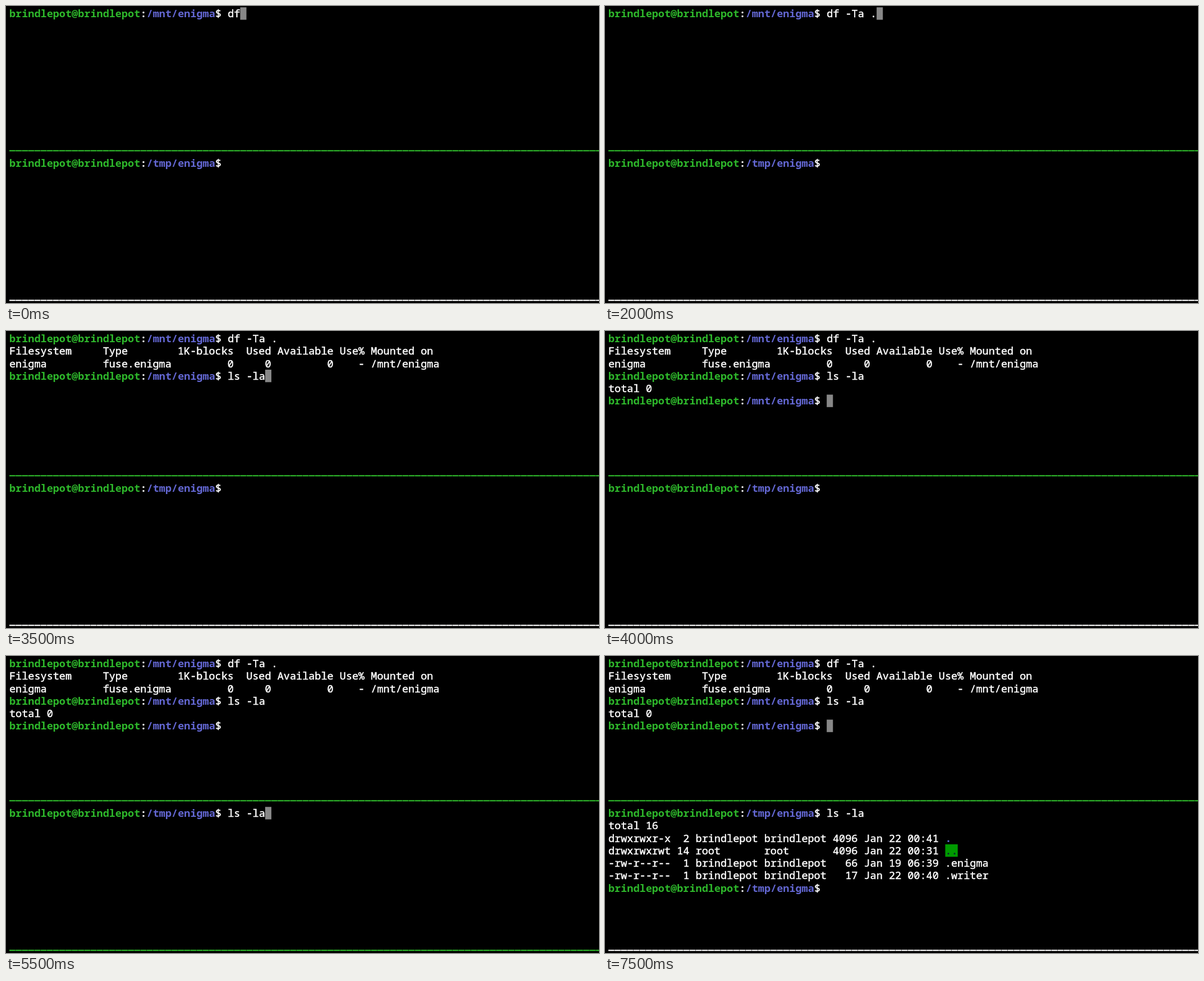
An HTML page with a canvas that plays this animation: 1057x530 px, repeating every 8 s.

```html
<!DOCTYPE html>
<html lang="en">
<head>
<meta charset="utf-8">
<style>
html, body { margin: 0; width: 100%; height: 100%; overflow: hidden; background: #000; }
canvas { display: block; }
</style>
</head>
<body>
<canvas id="screen" width="1057" height="530"></canvas>
<script>
const ctx = document.getElementById('screen').getContext('2d');
const LOOP = 8000, STEP = 500;
const LEFT = 6, TOP = 2.3, CELL = 11.12, LINE = 22.25, BASE = 17.8;
const WHITE = '#fff', GREEN = '#2eb82b', BLUE = '#6367d2', GRAY = '#878787';
const USER = 'brindlepot';
const LOWER = 12; // first row of the lower pane

const x = col => LEFT + col * CELL;
const y = row => TOP + row * LINE;

function text(row, col, str, color = WHITE, bold = false) {
  ctx.font = `${bold ? 700 : 400} 18.53px "Noto Sans Mono", "DejaVu Sans Mono", monospace`;
  ctx.fillStyle = ctx.strokeStyle = color;
  ctx.lineWidth = 0.5;
  ctx.fillText(str, x(col), y(row) + BASE);
  // A thin outline gives regular text its medium weight.
  if (!bold) ctx.strokeText(str, x(col), y(row) + BASE);
}

function block(row, col, cells, color) {
  ctx.fillStyle = color;
  ctx.fillRect(x(col), y(row), cells * CELL, LINE);
}

function prompt(row, dir, command = '') {
  text(row, 0, `${USER}@${USER}`, GREEN, true);
  text(row, 21, ':', WHITE, true);
  text(row, 22, dir, BLUE, true);
  text(row, 33, '$ ' + command);
}

function divider(row, color) {
  ctx.fillStyle = color;
  for (let col = 0; x(col) < 1057; col++) {
    ctx.fillRect(x(col), y(row + 0.5) - 1, CELL - 0.4, 2.2);
  }
}

const diskUsage = [
  'Filesystem     Type        1K-blocks  Used Available Use% Mounted on',
  'enigma         fuse.enigma         0     0         0    - /mnt/enigma'
];
const listing = [
  'total 16',
  `drwxrwxr-x  2 ${USER} ${USER} 4096 Jan 22 00:41`,
  'drwxrwxrwt 14 root       root       4096 Jan 22 00:31',
  `-rw-r--r--  1 ${USER} ${USER}   66 Jan 19 06:39 .enigma`,
  `-rw-r--r--  1 ${USER} ${USER}   17 Jan 22 00:40 .writer`
];

// What has been typed at each step, with the step at which typing starts.
const typing = {
  df: { start: 0, keys: ['df', 'df ', 'df -', 'df -Ta ', 'df -Ta .'] },
  upperLs: { start: 5, keys: ['', 'ls ', 'ls -la'] },
  lowerLs: { start: 9, keys: ['', 'ls ', 'ls -la'] }
};
function typed({ start, keys }, step) {
  return step < start ? '' : keys[Math.min(step - start, keys.length - 1)];
}

// Each pane returns the row and column of its cursor.
function upperPane(step) {
  const dir = '/mnt/enigma';
  const df = typed(typing.df, step), ls = typed(typing.upperLs, step);
  prompt(0, dir, df);
  if (step < 5) return [0, 35 + df.length];
  diskUsage.forEach((str, i) => text(1 + i, 0, str));
  prompt(3, dir, ls);
  if (step < 8) return [3, 35 + ls.length];
  text(4, 0, 'total 0');
  prompt(5, dir);
  return [5, 35];
}

function lowerPane(step) {
  const dir = '/tmp/enigma';
  const ls = typed(typing.lowerLs, step);
  prompt(LOWER, dir, ls);
  if (step < 12) return [LOWER, 35 + ls.length];
  listing.forEach((str, i) => text(LOWER + 1 + i, 0, str));
  text(LOWER + 2, 54, '.', BLUE, true);
  block(LOWER + 3, 54, 2, '#009a00');
  text(LOWER + 3, 54, '..', '#0a2430');
  prompt(LOWER + 6, dir);
  return [LOWER + 6, 35];
}

function draw(now) {
  const step = Math.floor((now % LOOP) / STEP);
  const lowerActive = step >= 9 && step < 15;
  ctx.fillStyle = '#000';
  ctx.fillRect(0, 0, 1057, 530);
  const upperCursor = upperPane(step), lowerCursor = lowerPane(step);
  divider(11, GREEN);
  divider(23, lowerActive ? GREEN : WHITE);
  block(...(lowerActive ? lowerCursor : upperCursor), 1, GRAY);
  requestAnimationFrame(draw);
}
requestAnimationFrame(draw);
</script>
</body>
</html>
```
